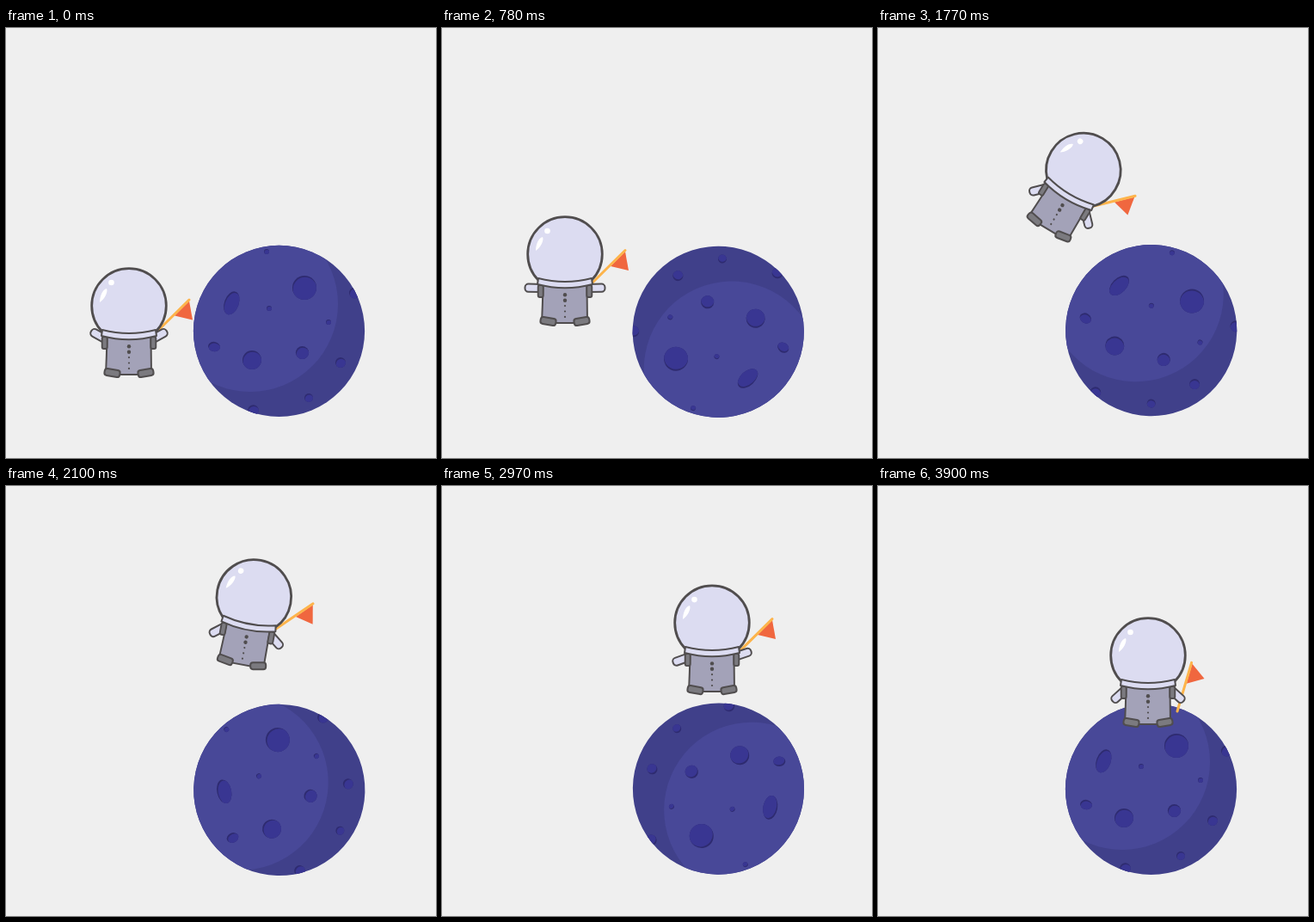
Animation, 500 px wide and 500 px high, one loop 4050 ms. Source, as an HTML page with a canvas:

```html
<!DOCTYPE html>
<html lang="en">
<head>
<meta charset="utf-8">
<title>Moon landing</title>
<style>
html, body { margin: 0; width: 100%; height: 100%; overflow: hidden; background: #efefef; }
canvas { display: block; width: 500px; height: 500px; }
</style>
</head>
<body>
<canvas id="stage" width="500" height="500"></canvas>
<script>
const ctx = document.getElementById('stage').getContext('2d');
const LOOP = 4050, STEP = 30, END = 3900, RAD = Math.PI / 180;
const INK = '#504d4e', GLASS = '#dcdcf1', SUIT = '#a3a2b8', GREY = '#7b7a7f';

// x, y, radius, squash, tilt
const CRATERS = [
  [347, 302, 14], [286, 386, 11], [262.3, 319.8, 14, 0.6, 20], [344.5, 377.5, 7.6],
  [242, 370.5, 5.7, 1.23, 10], [389, 389, 6], [352, 430, 5], [287.5, 444.5, 6.3],
  [405.5, 308, 6.5], [303, 260, 3], [306, 326, 3], [375, 342, 3]];

// Progress from 0 to 1 of a move that begins at start
const ramp = (t, start, length) => Math.min(1, Math.max(0, (t - start) / length));

// Two full turns, a little quicker at first
const spin = t => -264.6 * ramp(t, 0, 1350) - 127.6 * ramp(t, 1350, 750)
  - 327.8 * ramp(t, 2100, 1800);

function pose(t) {
  const rise = ramp(t, 0, 530), over = ramp(t, 886, 564), settle = ramp(t, 1797, 460);
  const land = ramp(t, 2640, 585), plant = ramp(t, 3500, 400);
  const lean = over - settle;
  const arms = 29 - 28 * rise - 46 * over + 45 * ramp(t, 2030, 450);
  return {
    x: 143 + 95.8 * over + 75.2 * settle,
    y: 323 - 60 * rise - 97.5 * over - 55.5 * settle + 87 * land,
    tilt: 31 * lean,
    left: arms - 35 * land - 7 * plant,
    right: arms + 33 * land - 75 * plant,
    flagX: 28 - 3 * lean + 6 * plant,
    flagY: 34.5 + 2.5 * rise - lean + 28 * plant,
    flagTurn: -29 * plant
  };
}

function placed(x, y, deg, draw) {
  ctx.save();
  ctx.translate(x, y);
  ctx.rotate(deg * RAD);
  draw();
  ctx.restore();
}

function paint(path, fill, stroke, width) {
  if (fill) { ctx.fillStyle = fill; ctx.fill(path); }
  if (stroke) { ctx.strokeStyle = stroke; ctx.lineWidth = width; ctx.stroke(path); }
}

function oval(x, y, r, squash = 1, tilt = 0) {
  const p = new Path2D();
  p.ellipse(x, y, r * squash, r, tilt * RAD, 0, 7);
  return p;
}

function box(x, y, w, h, r) {
  const p = new Path2D();
  p.roundRect(x, y, w, h, r);
  return p;
}

function drawPlanet(angle) {
  placed(319.5, 352.4, angle, () => {
    ctx.translate(-319.5, -352.4);
    const disc = oval(317.5, 352.4, 99.6);
    paint(disc, '#40408a');
    ctx.clip(disc);
    paint(oval(284, 321, 102), '#484898');
    for (const [x, y, r, squash, tilt] of CRATERS) {
      const hole = oval(x, y, r, squash, tilt);
      const depth = Math.min(1.8, r * 0.32);
      paint(hole, '#2e2b70');
      ctx.save();
      ctx.clip(hole);
      paint(oval(x + depth * 0.4, y + depth, r, squash, tilt), '#393692');
      ctx.restore();
    }
  });
}

const COLLAR = new Path2D('M-31 28Q0 36 31 28L32 35Q0 43.5 -32 35Z');
const BODY = new Path2D('M-25.5 36L25.5 36L26 80L-27 80Q-26 58 -25.5 36Z');
const SHINE = new Path2D('M-34 -4C-34 -11 -31 -19 -26 -20C-24 -16 -29 -7 -34 -4Z');
const PENNANT = new Path2D('M42 -40L46 -18L25 -23Z');
const POLE = new Path2D('M0 0L42 -41.5');

function drawArm(side, lift) {
  placed(side * 26, 39.5, 0, () => {
    ctx.scale(side, 1);
    ctx.rotate(-lift * RAD);
    paint(box(-3, -4.6, 23.5, 9.2, 4), GLASS, INK, 2);
  });
}

function drawAstronaut(p) {
  placed(p.x, p.y, p.tilt, () => {
    placed(p.flagX, p.flagY, p.flagTurn, () => {
      paint(PENNANT, '#f0673f');
      paint(POLE, null, '#fdb44b', 3);
    });
    paint(oval(0, 0, 43.3), GLASS, INK, 2.8);
    paint(SHINE, '#fff');
    paint(oval(-20.5, -27, 3.3), '#fff');
    drawArm(-1, p.left);
    drawArm(1, p.right);
    paint(BODY, SUIT, INK, 2);
    for (const side of [-1, 1]) {
      paint(box(side * 28.3 - 3, 36, 6, 14, 2), GREY, INK, 1.9);
      placed(side * 19.5, 78, side * -10, () => paint(box(-9, -4, 18, 8, 3), GREY, INK, 2));
    }
    paint(COLLAR, GLASS, INK, 2);
    for (let i = 0; i < 5; i++) paint(oval(0, 47.3 + 6.4 * i, i < 2 ? 2.2 : 1.1), INK);
  });
}

const start = performance.now();
function frame() {
  const now = (performance.now() - start) % LOOP;
  const t = Math.min(END, Math.floor(now / STEP) * STEP);
  ctx.fillStyle = '#efefef';
  ctx.fillRect(0, 0, 500, 500);
  drawPlanet(spin(t));
  drawAstronaut(pose(t));
  requestAnimationFrame(frame);
}
ctx.lineJoin = 'round';
ctx.lineCap = 'round';
frame();
</script>
</body>
</html>
```
